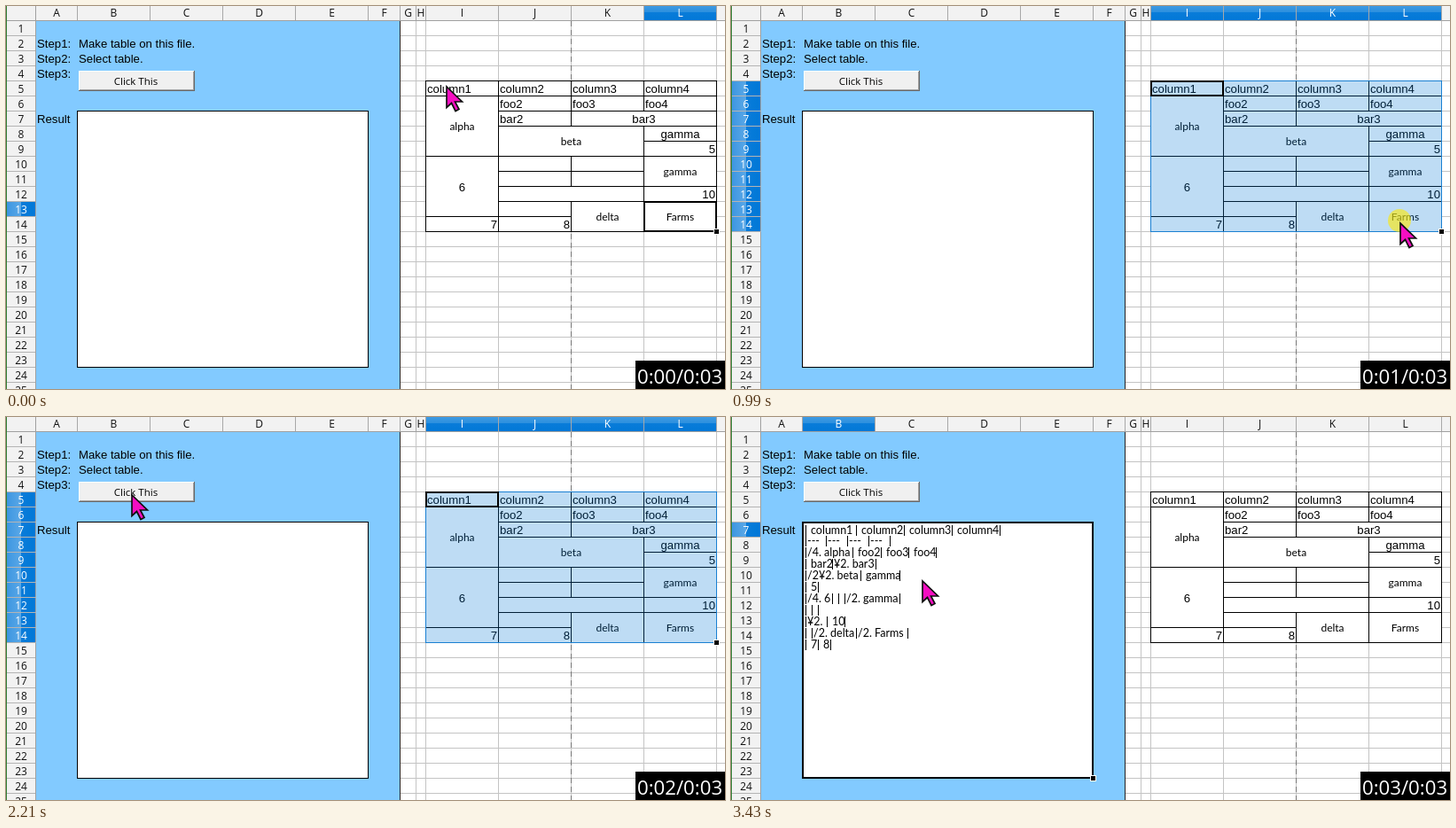
An HTML page that plays this animation: 811 px wide and 432 px high, repeating every 3760 ms.

```html
<!DOCTYPE html>
<html lang="en">
<head>
<meta charset="utf-8">
<title>Table to markup</title>
<style>
  html, body { margin: 0; width: 100%; height: 100%; overflow: hidden; background: #fff; }
  svg { display: block; width: 811px; height: 432px; }
  text { white-space: pre; }
  .cell { font: 13.2px "Liberation Sans", Arial, sans-serif; }
  .small { font: 12px Lato, sans-serif; }
  .out { font: 12.5px Lato, sans-serif; }
  .head { font: 12px "Open Sans", sans-serif; }
  .btn { font: 11.5px "Open Sans", sans-serif; }
  .clock { font: 22.2px "Open Sans", sans-serif; }
</style>
</head>
<body>
<svg viewBox="0 0 811 432" xmlns="http://www.w3.org/2000/svg">
  <defs>
    <linearGradient id="rowOn">
      <stop offset="0" stop-color="#3d96e1"/><stop offset=".5" stop-color="#5aa8e7"/>
      <stop offset=".5" stop-color="#0a7cd9"/><stop offset="1" stop-color="#0078d7"/>
    </linearGradient>
    <linearGradient id="colOn" x2="0" y2="1">
      <stop offset="0" stop-color="#3f9ae2"/><stop offset=".45" stop-color="#2b8fde"/>
      <stop offset=".45" stop-color="#0a7cd9"/><stop offset="1" stop-color="#0078d7"/>
    </linearGradient>
  </defs>
  <g id="sheet"></g>
  <g id="live"></g>
</svg>
<script>
(() => {
const LOOP = 3760, W = 811, H = 432;
const COLS = 'ABCDEFGHIJKLM';
const X = [33, 80, 162, 244, 326, 408, 444, 462, 473, 555, 637, 719, 801, 883];
const rowY = row => 17 * row - 1;

const rect = (x, y, w, h, fill, extra = '') =>
  `<rect x="${x}" y="${y}" width="${w}" height="${h}" fill="${fill}" ${extra}/>`;
const hline = (x1, x2, y, c) => rect(x1, y, x2 - x1 + 1, 1, c);
const vline = (x, y1, y2, c) => rect(x, y1, 1, y2 - y1 + 1, c);
const text = (s, x, y, cls, anchor = 'start', fill = '#000') =>
  `<text x="${x}" y="${y}" class="${cls}" text-anchor="${anchor}" fill="${fill}">${s}</text>`;

function parse(ref) {
  const [a, b = a] = ref.split(':');
  return [COLS.indexOf(a[0]), +a.slice(1), COLS.indexOf(b[0]), +b.slice(1)];
}
function area(ref) {
  const [c1, r1, c2, r2] = parse(ref);
  return { x1: X[c1], y1: rowY(r1), x2: X[c2 + 1], y2: rowY(r2 + 1) };
}
function frame(ref, c) {
  const { x1, y1, x2, y2 } = area(ref);
  return hline(x1, x2, y1, c) + hline(x1, x2, y2, c) + vline(x1, y1, y2, c) + vline(x2, y1, y2, c);
}

// l, c, r: cell text by alignment; m: middle of a merged cell
const CELLS = [
  ['I5', 'column1', 'l'], ['J5', 'column2', 'l'], ['K5', 'column3', 'l'], ['L5', 'column4', 'l'],
  ['I6:I9', 'alpha', 'm'], ['J6', 'foo2', 'l'], ['K6', 'foo3', 'l'], ['L6', 'foo4', 'l'],
  ['J7', 'bar2', 'l'], ['K7:L7', 'bar3', 'c'], ['J8:K9', 'beta', 'm'], ['L8', 'gamma', 'c'],
  ['L9', '5', 'r'], ['I10:I13', '6', 'c'], ['J10', ''], ['K10', ''], ['J11', ''], ['K11', ''],
  ['L10:L11', 'gamma', 'm'], ['J12:K12', ''], ['L12', '10', 'r'], ['J13', ''],
  ['K13:K14', 'delta', 'm'], ['L13:L14', 'Farms', 'm'], ['I14', '7', 'r'], ['J14', '8', 'r']
];

// each line: text between bars, and the place of every bar
const OUT = [
  ['| column1| column2| column3| column4|', [84, 141, 195, 249, 303]],
  ['|---|---|---|---|', [84, 107, 131, 155, 179]],
  ['|/4. alpha| foo2| foo3| foo4|', [84, 137, 169, 200, 231]],
  ['| bar2|¥2. bar3|', [84, 114, 163]],
  ['|/2¥2. beta| gamma|', [84, 146, 190]],
  ['| 5|', [84, 98]],
  ['|/4. 6| | |/2. gamma|', [84, 114, 121, 128, 190]],
  ['| | |', [84, 91, 98]],
  ['|¥2. | 10|', [84, 108, 128]],
  ['| |/2. delta|/2. Farms|', [84, 91, 141, 199]],
  ['| 7| 8|', [84, 98, 112]]
];

function cellText([ref, s, how]) {
  if (!s) return '';
  const { x1, y1, x2, y2 } = area(ref), mid = (x1 + x2) / 2, base = (y1 + y2) / 2 + 5;
  if (how === 'l') return text(s, x1 + 2, y2 - 3, 'cell');
  if (how === 'r') return text(s, x2 - 1, y2 - 3, 'cell', 'end');
  return text(s, mid + .5, base + (how === 'm' ? -.5 : .5), how === 'm' ? 'small' : 'cell', 'middle');
}

function colHead(c, on) {
  const w = X[c + 1] - X[c];
  return rect(X[c] + 1, 0, w - 1, 16, on ? 'url(#colOn)' : '#f2f2f2') + vline(X[c + 1], 0, 16, '#a8a8a8') +
    (c < 12 ? text(COLS[c], X[c] + w / 2 + .5, 12, 'head', 'middle', on ? '#fff' : '#111') : '');
}
function rowHead(r, on) {
  return rect(1, rowY(r) + 1, 32, 16, on ? 'url(#rowOn)' : '#f2f2f2') + hline(1, 33, rowY(r + 1), '#b4b4b4') +
    text(r, 17, rowY(r) + 13.5, 'head', 'middle', on ? '#fff' : '#111');
}

function sheet() {
  let s = rect(0, 0, W, H, '#fff');
  for (let r = 1; r <= 25; r++) s += hline(445, W, rowY(r), '#c4c4c4');
  for (const x of X.slice(7, 13)) s += vline(x, 17, H, '#c4c4c4');
  s += '<path d="M637.5 17V432" stroke="#777" stroke-dasharray="6 4"/>';
  s += rect(34, 17, 410, 415, '#82caff') + vline(444, 17, H, '#222');
  s += rect(80.5, 118.5, 328, 289, '#fff', 'stroke="#000"');
  ['Step1:', 'Step2:', 'Step3:'].forEach((t, i) => s += text(t, 35, 47 + 17 * i, 'cell'));
  s += text('Make table on this file.', 82, 47, 'cell') + text('Select table.', 82, 64, 'cell');
  s += text('Result', 35, 132, 'cell');
  for (const [ref] of CELLS) {
    const { x1, y1, x2, y2 } = area(ref);
    s += rect(x1, y1, x2 - x1, y2 - y1, '#fff');
  }
  for (const c of CELLS) s += frame(c[0], '#000') + cellText(c);
  s += rect(0, 0, 33, 16, '#f2f2f2');
  for (let c = 0; c < 13; c++) s += colHead(c, false);
  for (let r = 1; r <= 25; r++) s += rowHead(r, false);
  return s + hline(0, W, 16, '#a0a0a0') + vline(33, 0, H, '#a0a0a0') + vline(0, 0, H, '#2f7d32');
}

function heads(ref) {
  const [c1, r1, c2, r2] = parse(ref);
  let s = '';
  for (let c = c1; c <= c2; c++) s += colHead(c, true);
  for (let r = r1; r <= r2; r++) s += rowHead(r, true);
  return s;
}

// a merged cell is shaded whole when its first cell lies in the range
function shade(ref) {
  const [c1, r1, c2, r2] = parse(ref), on = new Set();
  for (const [cell] of CELLS) {
    const [a, b, d, e] = parse(cell);
    if (a < c1 || a > c2 || b < r1 || b > r2) continue;
    for (let c = a; c <= d; c++) for (let r = b; r <= e; r++) on.add(c + ',' + r);
  }
  let fill = '', edge = '';
  const blue = '#1a80d2';
  for (const key of on) {
    const [c, r] = key.split(',').map(Number), has = (i, j) => on.has(i + ',' + j);
    const x1 = X[c], x2 = X[c + 1], y1 = rowY(r), y2 = rowY(r + 1);
    fill += rect(x1, y1, x2 - x1, y2 - y1, '#0078d7');
    if (!has(c - 1, r)) edge += vline(x1, y1, y2, blue);
    if (!has(c + 1, r)) edge += vline(x2, y1, y2, blue);
    if (!has(c, r - 1)) edge += hline(x1, x2, y1, blue);
    if (!has(c, r + 1)) edge += hline(x1, x2, y2, blue);
  }
  return `<g opacity=".25" shape-rendering="crispEdges">${fill}</g>${edge}`;
}

function active(ref) {
  const { x1, y1, x2, y2 } = area(ref);
  return rect(x1 + 1, y1 + 1, x2 - x1 - 1, y2 - y1 - 1, 'none', 'stroke="#000" stroke-width="2"');
}
function handle(ref) {
  const { x2, y2 } = area(ref);
  return rect(x2 - 3, y2 - 3, 7, 7, '#fff') + rect(x2 - 2, y2 - 2, 5, 5, '#000');
}

function button(down) {
  const d = down ? 1 : 0, light = down ? '#696969' : '#fff', dark = down ? '#fff' : '#696969';
  return rect(82, 73, 131, 23, '#f0f0f0') + hline(82, 212, 73, light) + vline(82, 73, 95, light) +
    hline(82, 212, 95, dark) + vline(212, 73, 95, dark) +
    (down ? '' : hline(83, 211, 94, '#a0a0a0') + vline(211, 74, 94, '#a0a0a0')) +
    text('Click This', 146.5 + d, 89 + d, 'btn', 'middle');
}

function output() {
  return OUT.map(([line, bars], i) => {
    const y = 131.5 + 12.9 * i, parts = line.split('|').slice(1);
    return bars.map((x, k) => vline(x, Math.round(y) - 10, Math.round(y) + 1, '#000') +
      text(parts[k].trim(), x + (parts[k][0] === ' ' ? 6 : 2), y, 'out')).join('');
  }).join('');
}

function pointer(x, y, halo) {
  return (halo ? `<circle cx="${x - 1}" cy="${y - 3}" r="${halo}" fill="#ffea00" opacity=".6"/>` : '') +
    `<path transform="translate(${x} ${y})" d="M0 0V23.5L5.5 18.5L10 27.5L14 25.5L9.5 17H17.5Z" ` +
    'fill="#f60ec2" stroke="#111" stroke-width="1.7"/>';
}

const range = ref => ({ head: ref, sel: ref, box: 'I5' });
const scan = head => ({ head, sel: 'I5:L14', box: 'I5' });
const start = { head: 'L13', box: 'L13:L14' };
const all = range('I5:L14');
const done = { head: 'L13:L14', sel: 'L13:L14', box: 'L13:L14', out: true };
const result = { head: 'B7', box: 'B7:E23', out: true };

// time, pointer x, y, halo radius, sheet view, button down
const STEPS = [
  [0, 497, 91, 0, start],
  [330, 497, 91, 13, { head: 'I5', box: 'I5' }],
  [430, 515, 104, 13, range('I5:I6')],
  [540, 580, 140, 13, range('I5:J8')],
  [650, 655, 182, 13, range('I5:K10')],
  [750, 706, 211, 13, range('I5:K11')],
  [870, 738, 233, 13, range('I5:L12')],
  [980, 755, 245, 13, all],
  [1090, 755, 245, 0, all],
  [1430, 700, 224, 0, all],
  [1540, 480, 168, 0, all],
  [1650, 258, 115, 0, all],
  [1770, 146, 95, 0, all],
  [1870, 142, 88, 0, all],
  [1990, 142, 88, 13, all, true],
  [2100, 142, 88, 19, all],
  [2210, 142, 88, 0, all],
  [2430, 151, 96, 0, scan('J7')],
  [2530, 172, 114, 0, scan('J10')],
  [2650, 197, 145, 0, scan('K13')],
  [2760, 212, 168, 0, done],
  [2870, 216, 174, 0, done],
  [3210, 216, 181, 0, done],
  [3320, 216, 185, 13, result],
  [3430, 216, 185, 0, result]
];
const TICKS = [980, 1990, 2990];

function draw(t) {
  const [, x, y, halo, view, down] = STEPS.filter(s => s[0] <= t).pop();
  const secs = TICKS.filter(k => k <= t).length;
  return heads(view.head) + button(down) + (view.out ? output() : '') +
    (view.sel ? shade(view.sel) : '') + active(view.box) + handle(view.sel || view.box) +
    pointer(x, y, halo) + rect(710, 400, 101, 32, '#000') +
    text(`0:0${secs}/0:03`, 712, 425.5, 'clock', 'start', '#fff');
}

const live = document.getElementById('live');
document.getElementById('sheet').innerHTML = sheet();
const t0 = performance.now();
let shown = '';
function tick() {
  const next = draw((performance.now() - t0) % LOOP);
  if (next !== shown) live.innerHTML = shown = next;
  requestAnimationFrame(tick);
}
tick();
})();
</script>
</body>
</html>
```
